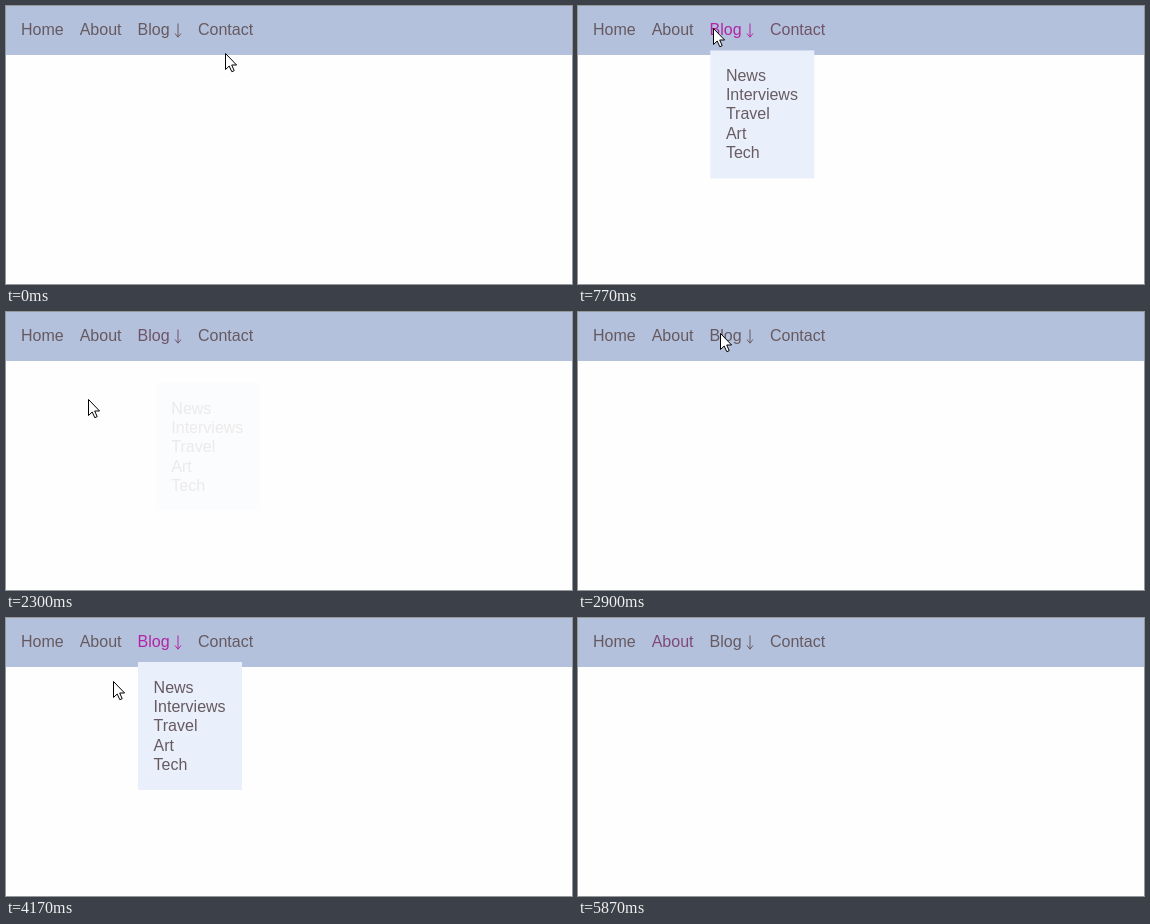
These frames come from a looping animation (566 by 278 pixels, 5.9 s). An HTML page:

```html
<!DOCTYPE html>
<html lang="en">
<head>
<meta charset="utf-8">
<title>Dropdown menu</title>
<style>
  html, body { margin: 0; width: 100%; height: 100%; overflow: hidden; background: #fefefe; }
  svg { display: block; width: 566px; height: 278px; }
  text { font: 16px "Liberation Sans", Arial, sans-serif; }
</style>
</head>
<body>
<svg viewBox="0 0 566 278">
  <rect width="566" height="278" fill="#fefefe"/>
  <rect width="566" height="49" fill="#b4c1dc"/>
  <g id="links"></g>
  <path id="arrow" d="M172 17.5V31M169 27.5L172 31.2L175 27.5" fill="none"/>
  <g id="menu">
    <rect x="132" y="44" width="104" height="128" fill="#e9effb"/>
  </g>
  <path id="cursor" d="M.5 .5V16.5L4.2 13L6.8 18.7L9.2 17.7L6.7 12H11.6Z" fill="#fff" stroke="#000"/>
</svg>
<script>
const LOOP = 5900, FADE = 600, LAG = 130;
const REST = [102, 90, 96], HOVER = [178, 36, 166];
const byId = id => document.getElementById(id);

const links = [
  { label: 'Home', x: 15, width: 43 },
  { label: 'About', x: 73.7, width: 42 },
  { label: 'Blog', x: 131.6, width: 44, hasMenu: true },
  { label: 'Contact', x: 192, width: 55 }
];

// Pointer tip: time, x, y. It browses the menu twice and leaves to the left.
const path = [
  [0, 219, 47], [200, 160, 24], [770, 135, 22], [850, 148, 14], [1215, 172, 165],
  [1550, 150, 95], [2300, 82, 87], [2430, 82, 85], [3010, 148, 14], [3270, 148, 14],
  [3700, 165, 168], [4050, 150, 12], [4170, 107, 63], [4630, 91, 84], [4800, 88, 84],
  [5220, 104, -24], [LOOP, 104, -24]
];

function pointerAt(t) {
  const next = path.findIndex(key => key[0] > t);
  const [t0, x0, y0] = path[next - 1], [t1, x1, y1] = path[next];
  const u = (t - t0) / (t1 - t0), k = u * u * (3 - 2 * u);
  return [x0 + (x1 - x0) * k, y0 + (y1 - y0) * k].map(Math.round);
}

// Times at which the page sees the pointer enter and leave a link, in turn.
function findHovers({ x, width, hasMenu }) {
  const times = [];
  let over = false;
  for (let t = 0; t < LOOP; t += 5) {
    const [px, py] = pointerAt(t);
    const onLink = px >= x && px <= x + width && py >= 0 && py < 49;
    const onMenu = hasMenu && over && px >= 132 && px <= 236 && py >= 44 && py <= 172;
    if ((onLink || onMenu) !== over) {
      over = !over;
      times.push(t + LAG);
    }
  }
  return times;
}

function addText(parent, label, x, y) {
  const el = document.createElementNS('http://www.w3.org/2000/svg', 'text');
  el.textContent = label;
  el.setAttribute('x', x);
  el.setAttribute('y', y);
  el.setAttribute('fill', `rgb(${REST})`);
  return parent.appendChild(el);
}

for (const link of links) {
  link.el = addText(byId('links'), link.label, link.x, 29);
  link.hovers = findHovers(link);
}
['News', 'Interviews', 'Travel', 'Art', 'Tech'].forEach((label, i) =>
  addText(byId('menu'), label, 147.6, Math.floor(75.5 + i * 19.2)));

// The CSS "ease" curve, cubic-bezier(.25, .1, .25, 1).
function ease(x) {
  if (x <= 0) return 0;
  if (x >= 1) return 1;
  const curve = (s, a, b) => 3 * a * s * (1 - s) ** 2 + 3 * b * s * s * (1 - s) + s ** 3;
  let low = 0, high = 1;
  for (let i = 0; i < 24; i++) {
    const mid = (low + high) / 2;
    if (curve(mid, .25, .25) < x) low = mid; else high = mid;
  }
  return curve(low, .1, 1);
}

// A transition reversed midway takes proportionally less time.
function hoverAmount(times, t) {
  let value = 0;
  for (let i = 0; i < times.length && times[i] < t; i++) {
    const goal = i % 2 ? 0 : 1;
    const end = Math.min(t, times[i + 1] ?? t);
    const span = FADE * Math.abs(goal - value);
    if (span) value += (goal - value) * ease((end - times[i]) / span);
  }
  return value;
}

function draw(t) {
  for (const link of links) {
    const amount = hoverAmount(link.hovers, t);
    const color = `rgb(${REST.map((c, i) => Math.round(c + (HOVER[i] - c) * amount))})`;
    link.el.setAttribute('fill', color);
    if (link.hasMenu) {
      const away = 1 - amount;
      byId('arrow').setAttribute('stroke', color);
      byId('menu').setAttribute('opacity', amount);
      byId('menu').setAttribute('transform', `translate(${20 * away} ${30 * away})`);
    }
  }
  byId('cursor').setAttribute('transform', `translate(${pointerAt(t)})`);
}

const start = performance.now();
function tick() {
  draw((performance.now() - start) % LOOP);
  requestAnimationFrame(tick);
}
tick();
</script>
</body>
</html>
```
